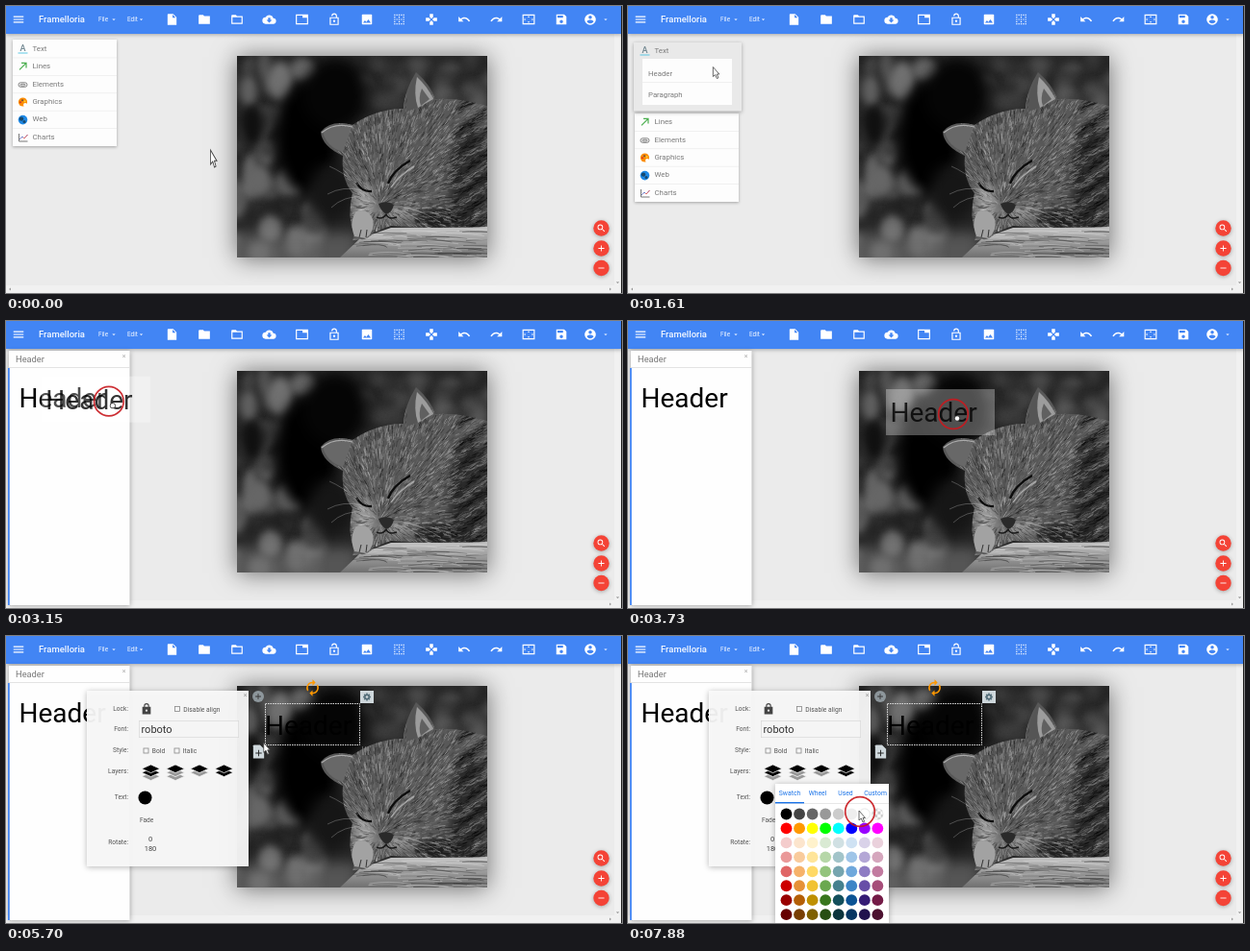
Recreate the animation shown at these times as an HTML page with a canvas. Size 640 by 299 pixels, loop 8000 ms.

```html
<!DOCTYPE html>
<html lang="en">
<head>
<meta charset="utf-8">
<title>Picture editor</title>
<style>
html, body { margin: 0; width: 100%; height: 100%; overflow: hidden; background: #ebebeb; }
canvas { display: block; }
</style>
</head>
<body>
<canvas id="stage" width="640" height="299"></canvas>
<script>
const view = document.getElementById('stage').getContext('2d');
let c = view;

const clamp = v => Math.max(0, Math.min(1, v));
const ramp = (t, a, b) => clamp((t - a) / (b - a));
const smooth = u => u * u * (3 - 2 * u);
const mix = (a, b, u) => a + (b - a) * u;

// ---------- drawing helpers ----------
function group(draw) { c.save(); draw(); c.restore(); }

function box(x, y, w, h, fill, blur = 0, shade = 'rgba(0,0,0,.3)') {
  group(() => {
    if (blur) { c.shadowColor = shade; c.shadowBlur = blur; c.shadowOffsetY = 1; }
    c.fillStyle = fill;
    c.fillRect(x, y, w, h);
  });
}

function oval(x, y, rx, ry, fill) {
  c.beginPath();
  c.ellipse(x, y, rx, ry, 0, 0, 7);
  c.fillStyle = fill;
  c.fill();
}

const disc = (x, y, r, fill) => oval(x, y, r, r, fill);

function shape(d, fill) {
  c.fillStyle = fill;
  c.fill(new Path2D(d));
}

function line(d, color, width = 1) {
  c.strokeStyle = color;
  c.lineWidth = width;
  c.stroke(new Path2D(d));
}

function text(s, x, y, size, fill, align = 'left', weight = 400) {
  c.font = `${weight} ${size}px Roboto, sans-serif`;
  c.textAlign = align;
  c.textBaseline = 'alphabetic';
  c.fillStyle = fill;
  c.fillText(s, x, y);
}

// Draws a path from a 24-unit grid, centred on x, y.
function icon(d, x, y, size, fill, flip = 1) {
  group(() => {
    c.translate(x, y);
    c.scale(flip * size / 24, size / 24);
    c.translate(-12, -12);
    c.fillStyle = fill;
    c.fill(new Path2D(d), 'evenodd');
  });
}

const round = (x, y, r) => `M${x - r} ${y}a${r} ${r} 0 1 0 ${2 * r} 0a${r} ${r} 0 1 0 ${-2 * r} 0z`;
const caret = 'M4 9h16l-8 8z';
const plus = 'M11 5h2v6h6v2h-6v6h-2v-6H5v-2h6z';
const minus = 'M5 11h14v2H5z';
const page = 'M5 2h9l6 6v14H4V3z';
const undo = 'M12.5 8c-2.6 0-5 1-6.9 2.6L2 7v9h9l-3.6-3.6c1.4-1.2 3.2-1.9 5.1-1.9 3.5 0 6.5 2.3 7.6 5.5l2.4-.8C21 11 17 8 12.5 8z';
const padlock = 'M4 8h3V6a5 5 0 0 1 10 0v2h3v14H4zM9 8h6V6a3 3 0 0 0-6 0z' + round(12, 15, 2);
const renew = 'M12 6v3l4-4-4-4v3a8 8 0 0 0-6.8 12.3l1.5-1.5A6 6 0 0 1 12 6zM18.8 7.7L17.3 9.2A6 6 0 0 1 12 18v-3l-4 4 4 4v-3a8 8 0 0 0 6.8-12.3z';

function dots() {
  let d = '';
  for (let x = 3; x < 20; x += 4)
    for (let y = 3; y < 20; y += 4)
      if (x % 8 == 3 || y % 8 == 3) d += `M${x} ${y}h2v2h-2z`;
  return d;
}

// ---------- fixed layer ----------
function toolbar() {
  box(0, 0, 640, 29, '#4285f4', 4);
  const put = (x, d, size = 14, flip) => icon(d, x, 14, size, '#fff', flip);
  put(13, 'M3 6h18v2H3zM3 11h18v2H3zM3 16h18v2H3z');
  text('Framelloria', 34, 17.3, 9.5, '#f4f8ff', 'left', 500);
  text('File', 96, 16.4, 6.4, '#f4f8ff');
  text('Edit', 126, 16.4, 6.4, '#f4f8ff');
  for (const x of [112, 140.5, 623]) put(x, caret, 5);
  put(172.5, page + 'M13 3.5V9h5.5z');
  put(206, 'M3 4h7l2 2h10v14H2V5z');
  put(240, 'M3 4h7l2 2h10v14H2V5zM4 8v10h16V8z');
  put(273.5, 'M19.3 10A7.5 7.5 0 0 0 5.4 8 6 6 0 0 0 6 20h13a5 5 0 0 0 .3-10zM17 13l-5 5-5-5h3V9h4v4z');
  put(307.5, 'M1 3h22v18H1zM3 5v14h18V9h-8V5z');
  put(341, 'M4 8h11V6a3 3 0 0 0-6 0H7a5 5 0 0 1 10 0v2h3v14H4zM6 10v10h12V10z' + round(12, 15, 2));
  put(375, 'M3 4l1-1h16l1 1v16l-1 1H4l-1-1zM8.5 13.5L5 18h14l-4.5-6-3.5 4.5z');
  put(408.5, dots());
  put(442, 'M9 2h6v5.5l-3 3-3-3zM2 9h5.5l3 3-3 3H2zM9 22v-5.5l3-3 3 3V22zM22 9v6h-5.5l-3-3 3-3z');
  put(476, undo);
  put(509.5, undo, 14, -1);
  put(543, 'M1 3h22v18H1zM3 5v14h18V5zM12 5.5L14 8h-4zM18 10l2.5 2L18 14zM6 10v4l-2.5-2zM10 16h4l-2 2.5z');
  put(577, 'M3 3h14l4 4v14H3zM5 5v4h10V5z' + round(12, 16, 3));
  put(607, round(12, 12, 10) + round(12, 8, 3) + 'M6 16c0-2 4-3 6-3s6 1 6 3a7.2 7.2 0 0 1-12 0z');
}

let seed = 7;
const rnd = () => (seed = seed * 16807 % 2147483647) / 2147483647;
const gray = (v, a = 1) => `rgba(${v},${v},${v},${a})`;

function garden() {
  box(230, 42, 280, 230, '#262626');
  c.filter = 'blur(4px)';
  for (let i = 0; i < 90; i++)
    oval(236 + 90 * rnd(), 45 + 215 * rnd(), 4 + 9 * rnd(), 5 + 11 * rnd(), gray(25 + 110 * rnd(), .7));
  for (let i = 0; i < 40; i++)
    oval(365 + 140 * rnd(), 50 + 55 * rnd(), 5 + 10 * rnd(), 4 + 8 * rnd(), gray(35 + 65 * rnd(), .7));
  oval(285, 78, 13, 20, '#707070');
  oval(252, 88, 9, 16, '#606060');
  oval(256, 125, 11, 20, '#101010');
  oval(262, 182, 14, 16, '#666');
  c.filter = 'blur(7px)';
  oval(312, 138, 33, 58, '#000');
  oval(342, 92, 34, 38, '#050505');
  oval(338, 195, 24, 30, '#161616');
  box(225, 236, 140, 40, gray(125, .55));
  c.filter = 'none';
}

function ledge() {
  const wood = c.createLinearGradient(0, 228, 0, 262);
  wood.addColorStop(0, '#c8c8c8');
  wood.addColorStop(1, '#707070');
  c.fillStyle = wood;
  c.fill(new Path2D('M347 262L368 242L400 231L500 230V262z'));
  for (let i = 0; i < 60; i++) {
    const x = 360 + 130 * rnd(), y = 234 + 28 * rnd();
    line(`M${x} ${y}q20 ${-4 * rnd()} ${25 + 30 * rnd()} ${2 * rnd()}`, gray(rnd() < .5 ? 45 : 215, .45), .9);
  }
}

function cat() {
  const body = new Path2D('M500 104Q470 95 446 97Q441 82 426 69Q414 88 413 107Q385 107 360 124Q338 118 327 131Q328 146 350 156Q348 180 360 195Q354 218 362 240Q372 248 382 236L400 229L440 231L500 230Z');
  c.fillStyle = '#585858';
  c.fill(body);
  group(() => {
    c.clip(body);
    c.filter = 'blur(5px)';
    oval(482, 180, 22, 60, '#2b2b2b');
    oval(372, 205, 12, 22, '#999');
    oval(408, 216, 24, 9, '#8c8c8c');
    oval(452, 222, 28, 12, '#1c1c1c');
    c.filter = 'none';
    // Tabby bands fan out from the nose and run across the flank.
    for (let i = 0; i < 4200; i++) {
      const x = 345 + 155 * rnd(), y = 97 + 137 * rnd();
      const dx = x - 388, dy = y - 208, r = Math.hypot(dx, dy), flank = x > 462 + 8 * rnd();
      const a = flank ? -.7 + .5 * rnd() : Math.atan2(dy, dx) + .45 * (rnd() - .5);
      const band = flank ? Math.sin(.28 * y + .2 * x) : Math.sin(17 * a + .06 * r);
      const v = clamp((flank ? 65 : 108) / 255 + .24 * band + .36 * (rnd() - .5)) * 255;
      const len = 3 + 5 * rnd();
      line(`M${x} ${y}l${len * Math.cos(a)} ${len * Math.sin(a)}`, gray(v, .6), .8);
    }
  });

  shape('M426 71Q415 90 416 110L428 106Q424 88 426 71z', '#555');
  shape('M427 74Q423 92 428 106L444 97Q438 84 427 74z', '#9c9c9c');
  shape('M432 86Q428 96 431 104L440 97z', '#606060');
  shape('M329 131Q342 122 359 127L350 152Q333 147 329 131z', '#686868');
  line('M328 132Q341 121 360 126', '#aaa', 1.2);
  shape('M362 240Q356 224 364 214Q376 210 381 222Q384 234 374 242z', '#a2a2a2');
  line('M367 241l2 -8M374 241l1 -8', '#333', 1);

  line('M364 184q6 10 16 9', '#0c0c0c', 2.4);
  line('M397 185q5 -14 23 -24', '#0c0c0c', 2.4);
  line('M400 189q9 -13 24 -22', gray(190, .7), 1.5);
  shape('M387 206q9 -4 16 1q-2 8 -8 10q-6 -4 -8 -11z', '#2a2a2a');
  line('M395 217q2 6 11 3M395 217q-4 6 -10 3', '#1a1a1a', 1.5);
  line('M370 192Q350 187 334 196M372 198Q350 198 338 210M366 186Q348 172 336 167M414 210Q435 214 452 226M414 214Q430 222 440 232', gray(210, .5), .6);
}

function photo() {
  box(240, 52, 260, 210, '#262626', 24, 'rgba(0,0,0,.55)');
  group(() => {
    c.beginPath();
    c.rect(240, 52, 260, 210);
    c.clip();
    garden();
    ledge();
    cat();
  });
}

function fab(y, d) {
  group(() => {
    c.shadowColor = 'rgba(0,0,0,.3)';
    c.shadowBlur = 4;
    c.shadowOffsetY = 1;
    disc(618.5, y, 8.2, '#f44336');
  });
  icon(d, 618.5, y, 10.5, '#fff');
}

function fixedLayer() {
  const layer = document.createElement('canvas');
  layer.width = 640;
  layer.height = 299;
  c = layer.getContext('2d');
  box(0, 0, 640, 299, '#ebebeb');
  photo();
  box(0, 291, 640, 8, '#f1f1f1');
  box(632, 28, 8, 271, '#f1f1f1');
  icon('M16 5v14l-8-7z', 4, 295, 5, '#888');
  icon('M8 5v14l8-7z', 628, 295, 5, '#888');
  icon(caret, 635.5, 288, 5, '#888');
  toolbar();
  fab(231.5, round(9.5, 9.5, 6.5) + round(9.5, 9.5, 4.5) + 'M14 15.5l1.5-1.5 5 5-1.5 1.5z');
  fab(252.5, plus);
  fab(273, minus);
  box(639, 0, 1, 299, '#222');
  c = view;
  return layer;
}

// ---------- side menu ----------
function itemIcon(i, y) {
  if (i == 0) {
    text('A', 17.5, y + 3, 9, '#6b828c', 'center', 500);
    box(12.5, y + 4.5, 10, 1, '#5cc8e4');
  } else if (i == 1) {
    line(`M14 ${y + 4}l6.5 -6.5M16 ${y - 3}h5v5`, '#4caf50', 1.2);
  } else if (i == 2) {
    c.beginPath();
    c.roundRect(13, y - 1, 9, 4.5, 2.2);
    c.roundRect(15, y + .5, 5, 1.8, .9);
    c.strokeStyle = '#777';
    c.lineWidth = .9;
    c.stroke();
  } else if (i == 3) {
    disc(17.5, y + .8, 4.6, '#fb8c00');
    disc(20, y + 3.8, 2, '#fff');
    for (const [dx, dy, k] of [[-2.5, 0, '#d32f2f'], [-.5, -2, '#6d4c41'], [2, -1, '#fdd835']]) disc(17.5 + dx, y + 1 + dy, 1, k);
  } else if (i == 4) {
    disc(17.5, y + 1, 4.8, '#1e88e5');
    disc(16, y, 2.2, '#17496e');
    disc(19, y + 3, 1.5, '#17496e');
  } else {
    line(`M13.5 ${y - 3}v8h9`, '#777');
    line(`M14 ${y + 3}l3 -3l2 2l3.5 -4`, '#7986cb');
    line(`M18 ${y + 1}l1 1l3.5 -4`, '#e57373');
  }
}

function menu(t) {
  const p = smooth(ramp(t, 800, 1540)), shift = 58 * p, lift = Math.min(1, 2 * p);
  const names = ['Text', 'Lines', 'Elements', 'Graphics', 'Web', 'Charts'];
  const ink = '#7a7a7a';
  if (!p) box(7, 35, 108, 111, '#fdfdfd', 3);
  else {
    box(7, 54 + shift, 108, 92, '#fdfdfd', 3);
    const top = 35 + 3 * lift;
    box(7 - lift, top, 108 + 4 * lift, 51.5 + shift - top, '#e9e9e9', 4);
    const h = 2 + 46 * clamp(2 * p - 1);
    box(15, 55, 93, h, '#fdfdfd');
    group(() => {
      c.beginPath();
      c.rect(15, 55, 93, h);
      c.clip();
      text('Header', 21, 73, 7.8, ink);
      box(15, 79, 93, .6, '#e8e8e8');
      text('Paragraph', 21, 95, 7.8, ink);
    });
  }
  names.forEach((name, i) => {
    const y = 44 + 18.4 * i + (i ? shift : 2 * lift);
    itemIcon(i, y);
    text(name, 27.5, y + 2.8, 7.85, ink);
    if (i < 5 && (i || !p)) box(7, y + 9.6, 108, .7, '#ebebeb');
  });
}

function panel(t) {
  box(3, 31, 125.5, 265, '#fefefe', 5);
  box(3, 48, 125.5, .8, '#ddd');
  box(2, 49, 1.8, 247, '#4285f4');
  text('Header', 10, 42.8, 9.3, '#777');
  text('×', 122.5, 38.5, 7, '#aaa', 'center');
  group(() => {
    c.globalAlpha = ramp(t, 2230, 2550);
    text('Header', 13.5, 90, 28, '#000');
  });
}

// ---------- text on the picture ----------
function ghost(x, y) {
  box(x - 69, y - 25, 113, 48, 'rgba(255,255,255,.3)');
  text('Header', x - 64.5, y + 9, 28, 'rgba(0,0,0,.8)');
}

function selection() {
  text('Header', 269, 102.5, 28, '#000');
  group(() => {
    c.setLineDash([1.5, 1]);
    c.strokeStyle = '#ddd';
    c.lineWidth = 1;
    c.strokeRect(269.5, 70.5, 98, 43);
  });
  disc(262, 63, 6, 'rgba(150,160,165,.9)');
  icon(plus, 262, 63, 10, '#333');
  icon(renew, 318.5, 54, 19, '#ff9800');
  box(368, 57, 14, 13, '#cfd8dc');
  for (let i = 0; i < 4; i++) {
    const a = i * Math.PI / 4, x = 4 * Math.cos(a), y = 4 * Math.sin(a);
    line(`M${375 - x} ${63.5 - y}L${375 + x} ${63.5 + y}`, '#546e7a', 1.5);
  }
  disc(375, 63.5, 3, '#546e7a');
  disc(375, 63.5, 1.3, '#cfd8dc');
  icon(page, 262.5, 120.5, 17, '#cfd8dc');
  icon(plus, 262.5, 122, 11, '#222');
  for (let i = 0; i < 3; i++) line(`M${370.5 + 3 * i} 115v9`, 'rgba(150,150,150,.7)', .8);
}

// ---------- dialogs ----------
function check(x, y, label) {
  c.strokeStyle = '#888';
  c.lineWidth = .8;
  c.strokeRect(x - 2.5, y - 2.5, 5, 5);
  text(label, x + 6.3, y + 2.6, 6.7, '#555');
}

function layers(x, fills) {
  for (let i = fills.length - 1; i >= 0; i--) {
    const d = `M${x} ${134 + 4 * i}l9.5 4.3l-9.5 4.3l-9.5 -4.3z`;
    shape(d, fills[i]);
    line(d, '#f4f4f4', .8);
  }
}

function dialog() {
  box(84, 57, 168, 183, 'rgba(250,250,250,.94)', 6);
  text('×', 248.5, 64, 7, '#999', 'center');
  const rows = { 'Lock:': 76, 'Font:': 97, 'Style:': 119, 'Layers:': 141, 'Text:': 168, 'Rotate:': 215 };
  for (const name in rows) text(name, 127, rows[name] + 2.4, 6.6, '#555', 'right');
  icon(padlock, 146, 76, 13, '#444');
  check(178, 76, 'Disable align');
  box(138, 88, 104, 18, '#d8d8d8');
  box(138.7, 88.7, 102.6, 16.6, '#f5f5f5');
  text('roboto', 140.5, 101, 11, '#333');
  check(145.5, 119.5, 'Bold');
  check(177.5, 119.5, 'Italic');
  const k = '#000', g = '#999';
  layers(150.5, [k, k, g]);
  layers(176, [k, g, g]);
  layers(201, [k, g]);
  layers(226.5, [k, k]);
  disc(144.5, 168.5, 7, k);
  text('Fade', 139, 194, 6.6, '#555');
  text('0', 150, 214, 7.5, '#444', 'center');
  text('180', 150, 224, 7.5, '#444', 'center');
}

const swatches = [
  '000 444 666 999 ccc eee fff',
  'f00 f90 ff0 0f0 0ff 00f 90f f0f',
  'f4cccc fce5cd fff2cc d9ead3 d0e0e3 cfe2f3 d9d2e9 ead1dc',
  'ea9999 f9cb9c ffe599 b6d7a8 a2c4c9 9fc5e8 b4a7d6 d5a6bd',
  'e06666 f6b26b ffd966 93c47d 76a5af 6fa8dc 8e7cc3 c27ba0',
  'c00 e69138 f1c232 6aa84f 45818e 3d85c6 674ea7 a64d79',
  '900 b45f06 bf9000 38761d 134f5c 0b5394 351c75 741b47',
  '600 783f04 7f6000 274e13 0c343d 073763 20124d 4c1130'
];

function rim(x, y) {
  c.beginPath();
  c.arc(x, y, 5.6, 0, 7);
  c.strokeStyle = '#ddd';
  c.lineWidth = .7;
  c.stroke();
}

function picker() {
  box(153, 154, 118, 146, '#fff', 6);
  const tabs = { Swatch: 168, Wheel: 197, Used: 226, Custom: 257 };
  for (const name in tabs) text(name, tabs[name], 165.5, 6.8, '#1a73e8', 'center');
  box(153, 174, 118, .7, '#ddd');
  box(153, 173, 30, 1.4, '#1a73e8');
  swatches.forEach((row, j) => row.split(' ').forEach((hex, i) => {
    const x = 164.5 + 13.55 * i, y = 185.5 + 14.95 * j;
    disc(x, y, 5.9, '#' + hex);
    if (hex == 'fff') rim(x, y);
  }));
  group(() => {
    c.beginPath();
    c.arc(259.3, 185.5, 5.9, 0, 7);
    c.clip();
    for (let i = 0; i < 16; i++)
      box(253 + 3.2 * (i % 4), 179.5 + 3.2 * (i >> 2), 3.2, 3.2, (i + (i >> 2)) % 2 ? '#ccc' : '#fff');
  });
  rim(259.3, 185.5);
}

// ---------- pointer ----------
const route = [
  [0, 212.5, 150], [580, 92.5, 43.5], [1300, 92.5, 43.5], [1750, 87, 70], [2370, 87, 70],
  [3000, 77.5, 81], [3730, 337, 96], [4213, 337, 96], [4867, 375, 64], [5200, 375, 64],
  [6020, 143.5, 166], [6370, 143.5, 166], [6500, 153, 157.5], [7280, 241, 182.5],
  [7440, 241, 182.5], [7570, 240, 182]
];

function pointer(t) {
  const i = route.findIndex(k => k[0] > t);
  if (i < 0) return route[route.length - 1].slice(1);
  const [a, x0, y0] = route[i - 1], [b, x1, y1] = route[i], u = smooth(ramp(t, a, b));
  return [mix(x0, x1, u), mix(y0, y1, u)];
}

// press, release, time to shrink away
const presses = [[2070, 2070, 280], [3030, 4050, 280], [5030, 5030, 280], [6370, 6370, 120], [7880, 8000, 280]];

function ring(t, x, y) {
  for (const [down, up, fade] of presses) {
    const u = ramp(t, up, up + fade);
    if (t < down || u == 1) continue;
    c.beginPath();
    c.arc(x + 1, y + 1, 15.3 - 10.5 * u, 0, 7);
    c.strokeStyle = `rgba(${up > down ? '200,25,30' : '225,60,60'},${.9 - .2 * u})`;
    c.lineWidth = 1.7;
    c.stroke();
  }
}

function arrow(x, y, stretch) {
  group(() => {
    c.translate(x, y);
    c.scale(1, stretch);
    const d = 'M0 0V10L2.3 8L4 12L5.6 11.3L4 7.5H6.5z';
    shape(d, '#fff');
    line(d, '#444', .8);
  });
}

const bursts = [
  [100, 580, 5], [880, 1750, 7], [2070, 3030, 7], [3150, 3730, 5], [4050, 5030, 7],
  [5160, 6020, 7], [6370, 7280, 8], [7440, 7570, 2], [7880, 7880, 1]
];

function snap(t) {
  let now = 0;
  for (const [a, b, n] of bursts) {
    if (t < a) break;
    const step = (b - a) / (n - 1) || 1;
    now = a + step * Math.min(n - 1, Math.floor((t - a) / step + .1));
  }
  return now;
}

const base = fixedLayer();

function frame(ms) {
  const t = snap(ms % 8000), [x, y] = pointer(t), dragging = t > 3100 && t < 4050;
  c.drawImage(base, 0, 0);
  if (t < 2200) menu(t); else panel(t);
  if (dragging) ghost(x, y);
  if (t >= 4050) selection();
  if (t > 5250) group(() => {
    c.globalAlpha = ramp(t, 5160, 5440);
    dialog();
  });
  if (t > 6400) picker();
  ring(t, x, y);
  if (dragging) {
    disc(x + 5, y + 5.5, 3, '#444');
    disc(x + 5, y + 5.5, 2.2, '#fff');
  } else arrow(x, y, t < 100 ? 1.5 : 1);
}

function loop() {
  frame(performance.now());
  requestAnimationFrame(loop);
}
loop();
</script>
</body>
</html>
```
